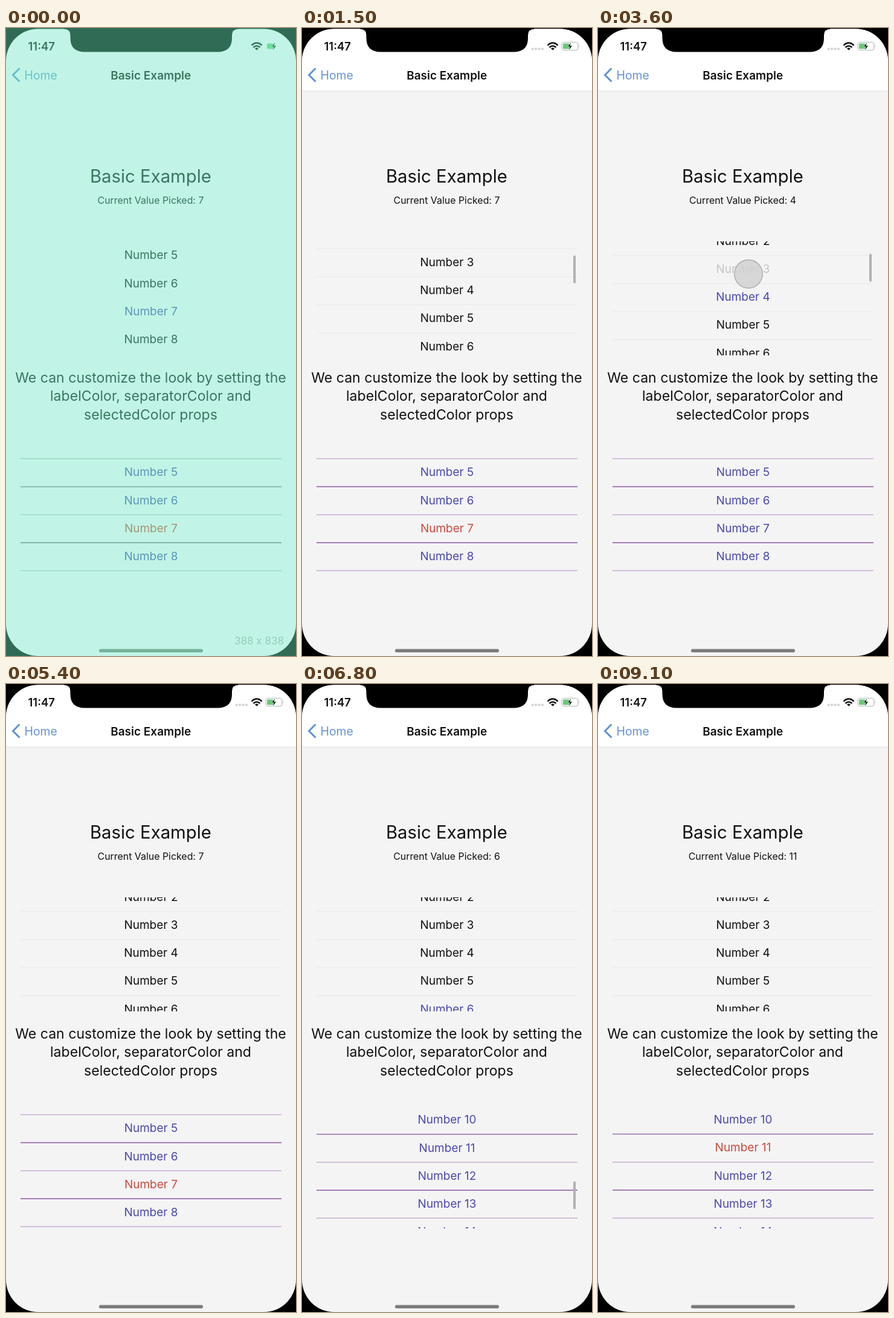
An HTML page that plays this animation: 480 px wide and 1036 px high, repeating every 9.2 s.

```html
<!DOCTYPE html>
<html lang="en">
<head>
<meta charset="utf-8">
<title>Number picker</title>
<style>
  html, body { margin: 0; width: 100%; height: 100%; overflow: hidden; background: #000; }
  svg { display: block; width: 100vw; height: 100vh; }
  text { font-family: Inter, Roboto, sans-serif; fill: #111; }
  .mid { text-anchor: middle; }
  .row { font-size: 19px; text-anchor: middle; }
</style>
</head>
<body>
<svg viewBox="0 0 480 1036">
  <defs>
    <clipPath id="upperClip"><rect y="352" width="480" height="188"/></clipPath>
    <clipPath id="lowerClip"><rect y="709" width="480" height="189"/></clipPath>
    <clipPath id="screen"><rect y="1.500" width="480" height="1034.500" rx="53"/></clipPath>
  </defs>
  <rect width="480" height="1036"/>
  <g clip-path="url(#screen)">
    <rect id="page" width="480" height="1036"/>
    <g id="header">
      <rect width="480" height="103.500" fill="#fff"/>
      <path id="headerLine" d="M0 104H480" stroke="#e6e6e6" stroke-width="1.2"/>
    </g>
  </g>
  <path d="M96 0V1.500q10.500 .5 10.500 11v4q0 23 24 23H350q24 0 24-23v-4q0-10.500 10.500-11V0z"/>

  <text x="36.500" y="36.800" font-size="18.500" font-weight="600">11:47</text>
  <g id="dots" fill="#d2d2d2">
    <circle cx="381.500" cy="34.500" r="2.100"/><circle cx="387" cy="34.500" r="2.100"/>
    <circle cx="392.500" cy="34.500" r="2.100"/><circle cx="398" cy="34.500" r="2.100"/>
  </g>
  <g fill="none" stroke="#111" stroke-width="2.600">
    <path d="M406.500 28.500Q415 20.500 423.500 28.500M409.500 32Q415 27 420.500 32"/>
    <path d="M415 36.800l-3-3q3-2.500 6 0z" fill="#111" stroke="none"/>
  </g>
  <g id="battery">
    <rect x="430" y="23.500" width="27" height="13" rx="4" fill="#fff" stroke="#b5b5b5" stroke-width="1.200"/>
    <path d="M458.800 28v4.500q1.700-2.200 0-4.500" fill="#b5b5b5"/>
  </g>
  <rect x="432" y="25.500" width="11" height="9" rx="2" fill="#68c878"/>
  <path d="M445.500 23.500l-6 7.300h3.600l-1.600 6 6-7.600h-3.700z" fill="#111" stroke="#fff" stroke-width=".5"/>

  <path d="M22.500 66.500L11.500 77.500L22.500 88.500" fill="none" stroke="#5e93d6" stroke-width="3"/>
  <text x="30.500" y="84.800" font-size="19.400" style="fill:#6595d3">Home</text>
  <text class="mid" x="239.700" y="84.500" font-size="19" font-weight="600">Basic Example</text>

  <text class="mid" x="239.400" y="255" font-size="29.300">Basic Example</text>
  <text id="picked" class="mid" x="239.500" y="290" font-size="15.900"></text>
  <g class="mid" font-size="23.100">
    <text x="239.500" y="584.800">We can customize the look by setting the</text>
    <text x="239.500" y="615.300">labelColor, separatorColor and</text>
    <text x="239.500" y="645.800">selectedColor props</text>
  </g>

  <g id="upper" clip-path="url(#upperClip)"></g>
  <g id="lower" clip-path="url(#lowerClip)"></g>
  <circle id="finger" cx="249" r="23.300" fill="#d3d3d3" fill-opacity=".85" stroke="#a9a9a9" stroke-width="1.300"/>
  <rect x="154" y="1024.500" width="172" height="5.500" rx="2.700" fill="#7b7b7b"/>

  <g id="intro">
    <text x="378" y="1016.500" font-size="17" style="fill:#b0a8b0">388 x 838</text>
    <rect width="480" height="1036" fill="#70fbc5" fill-opacity=".43"/>
  </g>
</svg>
<script>
const LOOP = 9200, PITCH = 46.2, ROWS = 20, START = 4 * PITCH;
const $ = id => document.getElementById(id);

function add(parent, tag, attrs, label = '') {
  const node = document.createElementNS('http://www.w3.org/2000/svg', tag);
  for (const name in attrs) node.setAttribute(name, attrs[name]);
  node.textContent = label;
  return parent.appendChild(node);
}

// A drag follows the finger, then coasts to its rest position.
const drags = {
  upper: { from: 500, to: 1000, release: 120, rest: 69.7, decay: 330, finger: 420 },
  lower: { from: 6000, to: 6300, release: 300, rest: 430, decay: 80, finger: 850 }
};
const taps = [
  { from: 2500, to: 2700, list: 'upper', value: 4 },
  { from: 3500, to: 3800, list: 'upper', value: 3 },
  { from: 4900, to: 5100, list: 'lower', value: 7 },
  { from: 5600, to: 5800, list: 'lower', value: 6 },
  { from: 7400, to: 7600, list: 'lower', value: 13 },
  { from: 8500, to: 8700, list: 'lower', value: 11 }
];

function makeList(name, top, colors, barTime) {
  const group = $(name);
  const rows = Array.from({ length: ROWS }, (_, i) => ({
    value: i + 1,
    line: add(group, 'path', { d: 'M24 0H456' }),
    label: add(group, 'text', { class: 'row', x: 240 }, 'Number ' + (i + 1))
  }));
  const bar = add(group, 'rect', { x: 449, width: 4, height: 46, rx: 2, fill: '#b1b1b1' });
  return { name, top, colors, barTime, rows, bar, drag: drags[name] };
}

const lists = [
  makeList('upper', 352, { label: '#111', selected: '#4a49ae' }, [500, 4700]),
  makeList('lower', 710, { label: '#4a49ae', selected: '#c94a3e' }, [6000, 7400])
];

function scrollAt(d, t) {
  if (t <= d.from) return START;
  if (t < d.to) return START + (d.release - START) * (t - d.from) / (d.to - d.from);
  return d.rest + (d.release - d.rest) * Math.exp((d.to - t) / d.decay);
}

const rowCenter = (list, value, t) =>
  list.top + (value - .5) * PITCH - scrollAt(list.drag, t);

const show = (node, on) => node.setAttribute('visibility', on ? 'visible' : 'hidden');

function lineStyle(list, y, t) {
  if (list.name === 'upper') return t ? ['#e9eaf0', 1.2] : ['none', 0];
  const strong = Math.round((y - list.top) / PITCH) % 2;
  if (t < 600) return strong ? ['#85758a', 1.6] : ['#b9b5bb', 1.3];
  return strong ? ['#9d6cab', 1.7] : ['#c9aed0', 1.5];
}

function drawList(list, t, picked, tap) {
  for (const { value, line, label } of list.rows) {
    const center = rowCenter(list, value, t), edge = center + PITCH / 2;
    const [stroke, width] = lineStyle(list, edge, t);
    line.setAttribute('transform', `translate(0 ${edge + .5})`);
    line.setAttribute('stroke', stroke);
    line.setAttribute('stroke-width', width);
    label.setAttribute('y', center + 6.2);
    label.style.fill = value === picked ? list.colors.selected : list.colors.label;
    label.style.opacity = tap && tap.list === list.name && tap.value === value ? .2 : 1;
  }
  list.bar.setAttribute('y', list.top + 3 + scrollAt(list.drag, t) * .25);
  show(list.bar, t >= list.barTime[0] && t < list.barTime[1]);
}

function fingerY(t, tap) {
  if (tap) return rowCenter(lists.find(l => l.name === tap.list), tap.value, t) + 8;
  const drag = Object.values(drags).find(d => t >= d.from && t < d.to);
  return drag ? drag.finger + START - scrollAt(drag, t) : null;
}

function draw(t) {
  const tap = taps.find(p => t >= p.from && t < p.to);
  const picked = taps.reduce((value, p) => t >= p.to ? p.value : value, 7);
  $('picked').textContent = 'Current Value Picked: ' + picked;
  lists.forEach(list => drawList(list, t, picked, tap));

  const y = fingerY(t, tap);
  show($('finger'), y !== null);
  if (y !== null) $('finger').setAttribute('cy', y);

  const intro = t < 100;
  $('intro').style.display = intro ? '' : 'none';
  $('header').style.display = intro ? 'none' : '';
  show($('dots'), !intro);
  show($('battery'), !intro);
  show($('headerLine'), t >= 600);
  $('page').setAttribute('fill', intro ? '#ffeeff' : '#f4f4f5');
}

const begin = performance.now();
function tick() {
  const t = (performance.now() - begin) % LOOP;
  draw(Math.floor(t / 100) * 100);
  requestAnimationFrame(tick);
}
tick();
</script>
</body>
</html>
```
